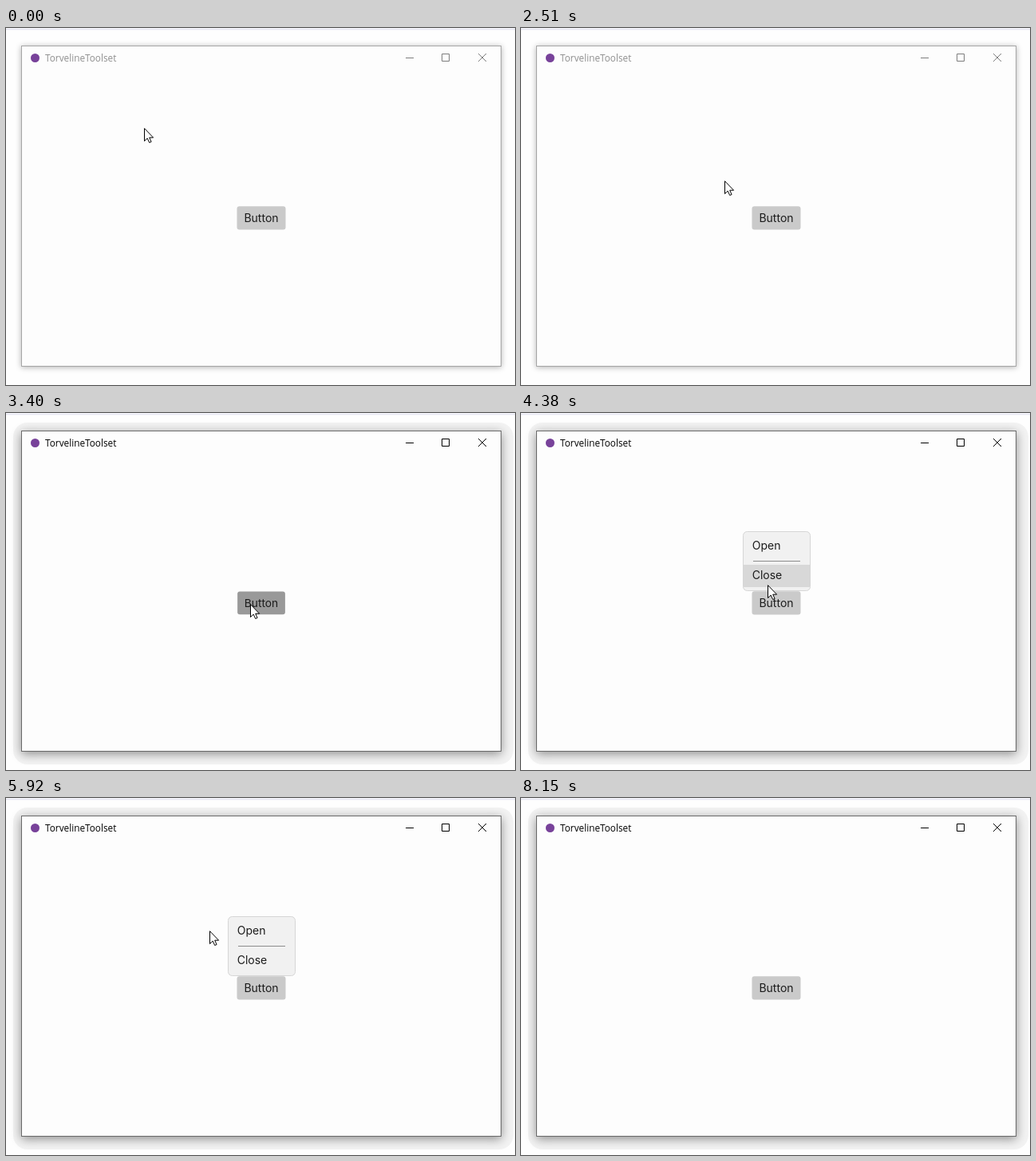
Recreate the animation shown at these times as an HTML page. Size 638 by 447 pixels, loop 8.86 s.

```html
<!DOCTYPE html>
<html lang="en">
<head>
<meta charset="utf-8">
<title>Menu flyout</title>
<style>
html, body { margin: 0; width: 638px; height: 447px; overflow: hidden; background: #fefefe; }
div, svg { position: absolute; box-sizing: border-box; }
#strip { left: 0; top: 0; width: 638px; height: 3px; background: linear-gradient(#f8f8fc 1px, #e8e8f3 1px 2px, #f5f5fa 2px); }
#halo { left: 9px; top: 12px; width: 627px; height: 428px; border-radius: 18px; background: #f3f3f3; visibility: hidden; }
#win { left: 19px; top: 22px; width: 602px; height: 402px; background: #fdfdfd;
  border: 1px solid #a6a6a6; box-shadow: 0 1px 7px rgba(0, 0, 0, .3); }
.active #halo { visibility: visible; }
.active #win { border-color: #6a6a6a; box-shadow: 0 3px 12px rgba(0, 0, 0, .42); }
svg { left: 0; top: 0; font: 14px Inter, sans-serif; fill: #1c1c1c; }
#caption { fill: #8f8f8f; stroke: #7d7d7d; }
.active #caption { fill: #000; stroke: #000; }
#caption text { font: 11.8px "Open Sans", sans-serif; stroke: none; }
#button { transform-origin: 320px 238px; }
</style>
</head>
<body>
<div id="strip"></div>
<div id="halo"></div>
<div id="win"></div>
<svg width="638" height="447">
  <circle cx="36.5" cy="37.5" r="5.5" fill="#78429a"/>
  <g id="caption">
    <text x="49" y="42">TorvelineToolset</text>
    <path fill="none" d="M501 37.5h10M546.5 32.5h9v9h-9zM592 32l10 10m0-10l-10 10"/>
  </g>
  <g id="button">
    <rect id="face" x="289.5" y="223.2" width="61" height="29.3" rx="3"/>
    <text x="320" y="243" text-anchor="middle">Button</text>
  </g>
  <g id="menu">
    <rect x="278.5" y="148.5" width="84" height="74" rx="5" fill="#f1f1f1" stroke="#d6d6d6"/>
    <rect id="highlight" x="279" width="83" height="28" fill="#d8d8d8"/>
    <path d="M291 185.5h59" stroke="#8c8c8c"/>
    <text x="289.7" y="171">Open</text>
    <text x="289.7" y="208">Close</text>
  </g>
  <path id="cursor" fill="#fff" stroke="#000" d="M.5 .7V16.6L4.2 13.1L6.7 18.5L9.1 17.5L6.7 12.2H11.6Z"/>
</svg>
<script>
const LOOP = 8860, PRESS = 3290, OPEN = 3590, DISMISS = 6790, LEAVE = 8150;
const $ = id => document.getElementById(id);
const smooth = p => p * p * (3 - 2 * p);
const smoother = p => p * p * p * (p * (6 * p - 15) + 10);
const easeOut = p => 1 - (1 - p) ** 2;
const gentle = p => (p + smooth(p)) / 2;
const speedUp = p => p ** 1.3;

// The pointer advances in discrete steps, the first one at `start`.
const moves = [
  { start: 2050, end: 2910, steps: 16, to: [306, 239], ease: [smoother, gentle] },
  { start: 4210, end: 4560, steps: 7, to: [310, 209], ease: [easeOut, easeOut] },
  { start: 4810, end: 5150, steps: 7, to: [312, 171], ease: [smooth, smooth] },
  { start: 5520, end: 5920, steps: 8, to: [255, 166], ease: [smooth, smooth] },
  { start: 7980, end: 8093, steps: 3, to: [542, 372], ease: [speedUp, speedUp] }
];

function pointerAt(t) {
  let pos = [173, 125];
  for (const { start, end, steps, to, ease } of moves) {
    if (t < start) break;
    const step = Math.floor((t - start) / (end - start) * (steps - 1) + .15) + 1;
    const p = Math.min(1, step / steps);
    pos = pos.map((from, i) => Math.round(from + (to[i] - from) * ease[i](p)));
  }
  return pos;
}

function render(t) {
  const [x, y] = pointerAt(t);
  const within = (left, top, right, bottom) => x >= left && x < right && y >= top && y < bottom;
  const show = (id, on) => $(id).setAttribute("visibility", on ? "visible" : "hidden");
  const menuOpen = t >= OPEN && t < DISMISS;
  const press = t < OPEN ? Math.min(1, Math.max(0, (t - PRESS + 55) / 110)) : 0;
  const hover = t < OPEN && within(289, 223, 351, 253);
  const tone = Math.round(hover ? 229 - 76 * press : 202);
  const row = within(279, 153, 362, 181) ? 153 : within(279, 190, 362, 218) ? 190 : 0;

  document.body.className = t >= PRESS ? "active" : "";
  $("face").setAttribute("fill", `rgb(${tone},${tone},${tone})`);
  $("button").style.transform = t >= PRESS && press ? `scale(${1 - .02 * press})` : "none";
  show("menu", menuOpen);
  show("highlight", menuOpen && row);
  $("highlight").setAttribute("y", row);
  show("cursor", t < LEAVE);
  $("cursor").setAttribute("transform", `translate(${x} ${y})`);
}

const begin = performance.now();
function tick() {
  render((performance.now() - begin) % LOOP);
  requestAnimationFrame(tick);
}
tick();
</script>
</body>
</html>
```
